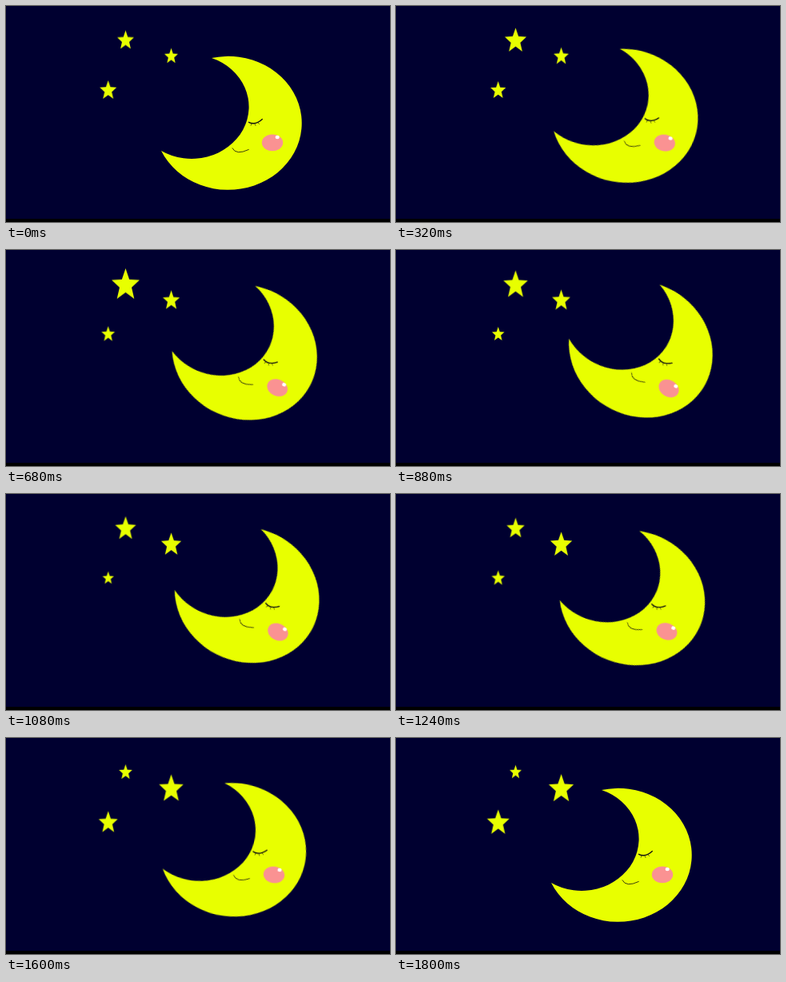
An HTML page without scripts that plays this animation: 480 by 270 pixels, repeating every 2040 ms.

```html
<!DOCTYPE html>
<html lang="en">
<head>
<meta charset="utf-8">
<title>Sleeping moon</title>
<style>
  html, body { margin: 0; width: 100%; height: 100%; overflow: hidden; background: #000030; }
  svg { display: block; width: 100vw; height: 100vh; }

  .moon, .star {
    animation: rock 2040ms -1ms infinite;
    animation-timing-function: step-end;
  }
  .moon { transform-origin: 333px 186.5px; }
  .star { transform-origin: 0 0; }
  .a { animation-name: twinkle-a; }
  .b { animation-name: twinkle-b; }
  .c { animation-name: twinkle-c; }

  /* every step lasts 40 ms */
  @keyframes rock {
    0%       { transform: rotate(0deg); }
    1.9608%  { transform: rotate(0deg); animation-timing-function: steps(22); }
    45.098%  { transform: rotate(32.1deg); animation-timing-function: steps(22); }
    88.2353%, 100% { transform: rotate(0deg); }
  }
  @keyframes twinkle-a {
    0%       { transform: scale(.21); }
    1.9608%  { transform: scale(.21); animation-timing-function: steps(16); }
    33.3333% { transform: scale(.35); animation-timing-function: steps(19); }
    70.5882% { transform: scale(.18); animation-timing-function: steps(9); }
    88.2353%, 100% { transform: scale(.15); }
  }
  @keyframes twinkle-b {
    0%       { transform: scale(.17); }
    1.9608%  { transform: scale(.17); animation-timing-function: steps(20); }
    41.1765% { transform: scale(.223); animation-timing-function: steps(15); }
    70.5882% { transform: scale(.298); animation-timing-function: steps(9); }
    88.2353%, 100% { transform: scale(.313); }
  }
  @keyframes twinkle-c {
    0%       { transform: scale(.21); }
    1.9608%  { transform: scale(.21); animation-timing-function: steps(27); }
    54.902%  { transform: scale(.14); animation-timing-function: steps(17); }
    88.2353%, 100% { transform: scale(.28); }
  }
</style>
</head>
<body>
<svg viewBox="0 0 480 270" preserveAspectRatio="none">
  <defs>
    <path id="star" d="M0-54.5 13.3-15.2 50-12.8 21.5 13.8 30.9 54.5 0 31.7-30.9 54.5-21.5 13.8-50-12.8-13.3-15.2Z"/>
  </defs>

  <rect width="480" height="270" fill="#000030"/>
  <rect y="266" width="480" height="4" fill="#000"/>

  <g fill="#e8ff00">
    <g transform="translate(149.5 42)"><use class="star a" href="#star"/></g>
    <g transform="translate(206.5 62)"><use class="star b" href="#star"/></g>
    <g transform="translate(127.7 104.5)"><use class="star c" href="#star"/></g>
  </g>

  <g class="moon">
    <path fill="#e8ff00" d="M257 65A92 83.5 0 1 1 194 181A71.6 65 0 1 0 257 65Z"/>
    <g fill="none" stroke="#111" stroke-linecap="round">
      <path stroke-width="1.3" d="M303.5 145.3Q312 149.5 320.3 141.5"/>
      <path stroke-width=".6" d="M307 147l-.8 2.2M311 147.2l.9 2.2M315 146l1.6 1.6"/>
      <path stroke-width=".8" d="M283 177.8Q287.5 187 303.3 179.5"/>
    </g>
    <ellipse cx="333" cy="170.8" rx="13.2" ry="10.4" fill="#fa9292"/>
    <ellipse cx="339.2" cy="164" rx="2.6" ry="2.2" fill="#fff"/>
  </g>
</svg>
</body>
</html>
```
